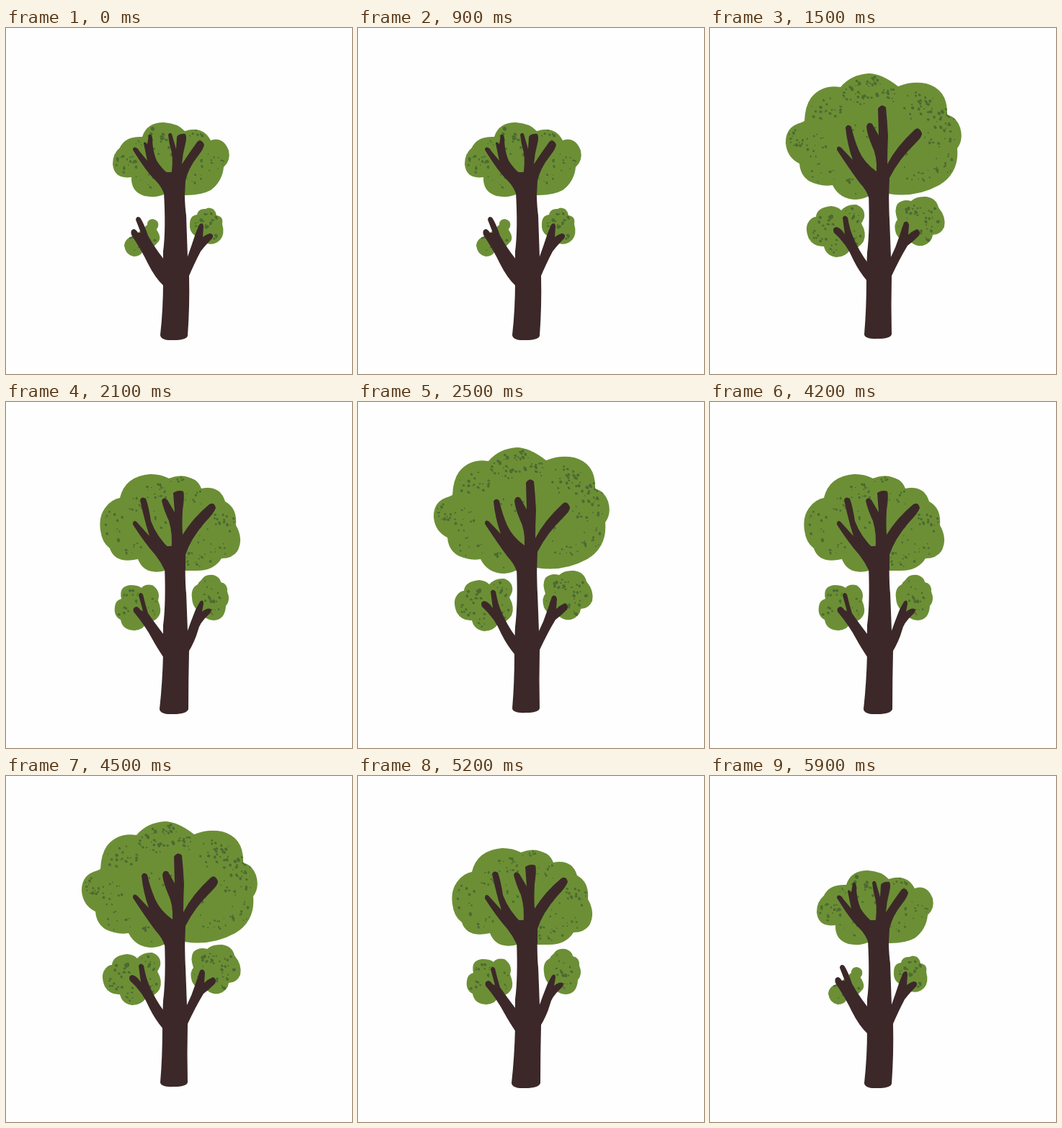
Animation of 480 by 480 pixels, one loop 6 s. Source, as an HTML page:

```html
<!DOCTYPE html>
<html lang="en">
<head>
<meta charset="utf-8">
<title>Growing tree</title>
<style>
  html, body { margin: 0; width: 100%; height: 100%; overflow: hidden; background: #fefefe; }
  svg { display: block; width: 100vw; height: 100vh; }
  .leaf { fill: #6c8f36; }
  .spot { fill: #4b6b31; }
  .wood { fill: #3c2829; }
</style>
</head>
<body>
<svg id="stage" viewBox="0 0 480 480"></svg>
<script>
const LOOP = 6000;
const NS = 'http://www.w3.org/2000/svg';
const stage = document.getElementById('stage');

// Each leaf blob: outline, then spot clusters [x, y, rx, ry, count, size].
const small = {
  leaves: [
    ['M148 189Q148 174 158 166Q165 150 189 151Q195 131 219 131Q238 132 248 143Q273 135 284 156Q301 150 309 170Q312 184 302 193Q300 213 284 225Q271 232 250 232L219 231Q208 236 192 233Q173 227 174 207Q150 210 148 189Z',
      [[168, 189, 17, 13, 21, 1.6], [211, 150, 15, 13, 12, 2], [218, 170, 16, 9, 9, 1.5], [263, 149, 13, 8, 7, 2],
       [285, 187, 20, 13, 15, 1.4], [199, 211, 24, 12, 9, 1.4], [266, 210, 15, 11, 7, 1.4], [185, 164, 10, 9, 6, 1.6]]],
    ['M196 273Q196 265 204 265Q213 267 211 276Q208 280 209 280Q217 292 210 298Q204 306 190 309Q187 317 177 317Q166 315 164 302Q165 291 178 288L188 280Z',
      [[181, 298, 14, 12, 9, 1.7], [203, 291, 6, 6, 3, 1.8]]],
    ['M255 272Q255 260 265 259Q267 250 277 251Q281 248 287 251Q291 254 292 260Q302 261 300 272Q304 286 297 294Q289 302 279 299Q269 298 266 290Q254 285 255 272Z',
      [[282, 265, 14, 13, 15, 1.8], [292, 289, 6, 6, 4, 1.6], [264, 276, 6, 8, 4, 1.4]]]
  ],
  wood: [
    'M214 426Q218 390 218 352Q218 330 218 310Q222 280 219 228L220 200L248 200Q247 240 250 260Q251 290 252 318Q254 332 254 345Q255 385 252 427Q250 433 232 433Q215 434 214 426Z',
    'M219 358Q207 347 197 327Q189 310 174 287Q172 280 177 279Q180 279 183 284L187 284L180 266Q181 260 186 263Q191 270 197 288Q203 300 219 321L226 340Z',
    'M251 320Q257 303 263 285L268 273Q273 268 274 275L273 290Q280 285 284 285Q289 287 286 292Q276 302 270 310Q262 325 253 346L246 335Z',
    'M220 232Q216 220 207 211Q195 200 176 169Q176 164 181 166L196 184L191 160Q192 156 196 161L198 149Q201 145 203 152Q203 170 209 184Q217 197 229 205Q232 188 230 173Q226 160 225 148Q227 144 230 147L236 168L237 151Q240 146 249 147Q251 152 249 160Q245 175 244 189Q255 172 266 157Q272 154 275 162Q274 168 266 178Q253 194 249 212L248 232Z'
  ]
};

const medium = {
  leaves: [
    ['M131 178Q128 158 139 145Q147 135 158 133Q165 103 200 100Q215 100 226 106Q244 98 262 108Q268 112 271 120Q297 115 304 138Q321 147 319 171Q330 190 321 207Q314 217 299 217Q288 235 262 234L221 234Q192 241 183 218Q151 225 144 203Q133 195 131 178Z',
      [[151, 170, 17, 25, 11, 1.6], [205, 125, 22, 12, 17, 1.7], [180, 142, 14, 9, 11, 1.4], [235, 107, 13, 4, 7, 1.7],
       [262, 129, 15, 15, 9, 1.5], [303, 167, 18, 22, 15, 1.6], [265, 218, 20, 12, 19, 1.5], [297, 201, 16, 12, 8, 1.4],
       [171, 202, 18, 10, 7, 1.6], [212, 165, 18, 18, 9, 1.4], [267, 184, 17, 17, 8, 1.3]]],
    ['M160 273Q156 256 172 254Q184 254 188 258Q192 252 203 254Q215 262 211 275Q217 290 212 297Q207 305 195 306Q191 316 178 317Q161 316 159 302Q149 297 151 284Q152 275 160 273Z',
      [[174, 270, 14, 11, 11, 1.7], [165, 291, 11, 8, 6, 1.6], [203, 284, 8, 14, 6, 1.5]]],
    ['M271 247Q276 238 288 240Q297 243 298 250Q308 252 307 263Q312 275 305 283Q304 302 288 303Q275 302 272 292Q259 288 258 272Q256 258 266 253Q268 249 271 247Z',
      [[284, 270, 13, 11, 14, 1.8], [292, 291, 8, 7, 5, 1.5], [281, 252, 9, 7, 3, 1.4]]]
  ],
  wood: [
    'M213 426Q217 390 218 350Q218 330 218 310Q222 280 220 228L221 200L249 200Q248 250 250 265Q251 290 252 318Q254 332 254 345Q253 385 253 426Q251 433 232 433Q214 434 213 426Z',
    'M219 355Q209 340 203 329Q193 310 177 291Q175 284 182 284Q185 286 187 289L190 290L184 268Q186 262 190 267Q193 280 197 293Q206 306 219 323L226 340Z',
    'M251 320Q257 303 263 288L269 277Q274 273 274 280L272 291Q279 285 284 287Q287 290 281 295Q268 307 266 318Q262 332 253 347L246 335Z',
    'M220 233Q215 222 207 212Q192 195 176 170Q176 163 181 166L199 186Q191 160 186 136Q188 130 194 134Q198 145 201 165Q209 187 229 206Q232 185 226 165Q219 150 216 137Q219 130 224 136L234 153L232 126Q239 121 246 124Q248 130 245 150Q244 170 245 184Q260 160 282 142Q289 138 291 147Q288 155 276 167Q256 190 249 212L249 233Z'
  ]
};

const large = {
  leaves: [
    ['M127 131Q104 137 105 160Q107 180 124 188Q126 212 150 217Q160 220 170 218Q180 238 203 238Q215 237 222 232L248 230Q285 236 318 218Q346 201 343 167Q352 155 347 138Q342 124 329 120Q330 85 300 77Q280 73 261 81Q238 63 220 63Q195 65 181 82Q155 78 140 97Q132 108 131 129Z',
      [[225, 73, 27, 8, 18, 1.7], [208, 92, 25, 15, 25, 1.8], [246, 96, 16, 14, 15, 1.7], [286, 105, 26, 22, 26, 1.8],
       [322, 127, 22, 15, 22, 1.9], [318, 152, 22, 15, 14, 1.6], [326, 188, 14, 18, 11, 1.7], [299, 204, 22, 14, 9, 1.4],
       [160, 112, 23, 17, 25, 1.7], [122, 150, 15, 14, 15, 1.8], [151, 164, 22, 18, 15, 1.6], [158, 200, 23, 14, 11, 1.4],
       [202, 216, 17, 14, 9, 1.6], [276, 187, 26, 26, 13, 1.4], [211, 145, 20, 22, 10, 1.4]]],
    ['M147 262Q148 249 168 247Q178 248 182 253Q190 244 203 245Q216 250 214 263Q212 268 210 271Q218 285 213 296Q207 306 195 307Q188 318 175 318Q161 316 158 303Q144 304 137 292Q130 275 139 266Q143 262 147 262Z',
      [[160, 266, 16, 14, 14, 1.8], [197, 260, 14, 11, 11, 1.6], [152, 288, 12, 9, 8, 1.6], [178, 303, 12, 10, 7, 1.7], [205, 289, 7, 11, 5, 1.5]]],
    ['M260 266Q255 252 260 244Q268 237 279 240Q286 233 300 234Q314 236 317 249Q328 262 325 276Q320 287 309 287Q308 298 295 302Q285 303 280 298Q265 299 258 285Q254 272 260 266Z',
      [[279, 254, 17, 12, 14, 1.8], [306, 264, 13, 16, 13, 1.7], [298, 287, 12, 10, 9, 1.7], [268, 281, 9, 10, 6, 1.5]]]
  ],
  wood: [
    'M214 425Q217 390 217 350Q217 330 218 312Q222 280 220 230L221 200L248 200Q248 250 249 265Q250 290 251 318Q252 332 252 345Q251 385 252 425Q250 431 233 431Q215 432 214 425Z',
    'M218 351Q207 338 199 322Q190 300 172 284Q169 277 175 276Q180 277 184 282L187 286L184 263Q187 258 191 263Q194 280 199 291Q207 310 219 326L226 340Z',
    'M250 320Q258 304 263 288L269 270Q274 266 276 273L275 287Q280 282 287 279Q293 282 290 288Q282 296 274 302Q263 320 251 346L246 335Z',
    'M220 235Q218 226 207 214Q193 195 176 169Q176 162 182 166L198 183Q190 160 188 138Q191 132 196 137Q200 155 207 171Q214 187 231 199Q232 178 225 164Q218 148 217 137Q219 129 225 133L234 149L233 112Q238 104 244 110Q246 130 247 150Q246 170 246 189Q258 165 284 141Q290 136 294 146Q295 150 285 160Q262 182 249 208L248 235Z'
  ]
};

// In-between pose: wood blended, leaves shrunk about their own anchors.
function blend(a, b, k) {
  const to = b.match(/\d+/g);
  let i = 0;
  return a.replace(/\d+/g, n => (+n + (to[i++] - n) * k).toFixed(1));
}
const anchors = [[232, 238, .922], [214, 306, .9], [258, 300, .87]];
const growing = {
  leaves: large.leaves,
  wood: medium.wood.map((d, i) => blend(d, large.wood[i].replace(/\s+/g, ' '), .5)),
  anchors
};

function add(parent, tag, attrs) {
  const el = document.createElementNS(NS, tag);
  for (const k in attrs) el.setAttribute(k, attrs[k]);
  return parent.appendChild(el);
}

function randomizer(seed) {
  return () => (seed = seed * 16807 % 2147483647) / 2147483647;
}

function spots(clusters, rnd) {
  let d = '';
  for (const [cx, cy, rx, ry, count, size] of clusters) {
    for (let i = 0; i < count; i++) {
      const a = rnd() * Math.PI * 2, r = Math.sqrt(rnd());
      const x = cx + Math.cos(a) * rx * r, y = cy + Math.sin(a) * ry * r;
      const w = size * (.45 + rnd() * .85), h = w * (.65 + rnd() * .35);
      const arc = `a${w.toFixed(2)} ${h.toFixed(2)} ${(rnd() * 90) | 0} 1 0 `;
      d += `M${(x - w).toFixed(1)} ${y.toFixed(1)}${arc}${2 * w} 0${arc}${-2 * w} 0`;
    }
  }
  return d;
}

function build(pose, index) {
  const g = add(stage, 'g', { visibility: 'hidden' });
  pose.leaves.forEach(([outline, clusters], i) => {
    const id = `clip${index}-${i}`;
    const leaf = add(g, 'g', {});
    if (pose.anchors) {
      const [x, y, s] = pose.anchors[i];
      leaf.setAttribute('transform', `translate(${x} ${y}) scale(${s}) translate(${-x} ${-y})`);
    }
    add(add(leaf, 'clipPath', { id }), 'path', { d: outline });
    add(leaf, 'path', { d: outline, class: 'leaf' });
    const rnd = randomizer(7919 * (index + 1) + 131 * i);
    add(leaf, 'path', { d: spots(clusters, rnd), class: 'spot', 'clip-path': `url(#${id})` });
  });
  for (const d of pose.wood) add(g, 'path', { d, class: 'wood' });
  return g;
}

const groups = [small, medium, growing, large].map(build);

// Start times of the four poses in each growth cycle.
const cycles = [
  [0, 100, 400, 500], [900, 1100, 1300, 1500], [2000, 2100, 2400, 2500],
  [3000, 3100, 3400, 3500], [3900, 4200, 4400, 4500], [4900, 5200, 5400, 5500], [5900]
];
const steps = cycles.flatMap(c => c.map((time, pose) => ({ time, pose })));

let shown = -1;
function show(t) {
  const { pose } = steps.findLast(s => s.time <= t);
  if (pose !== shown) {
    groups.forEach((g, i) => g.setAttribute('visibility', i === pose ? 'visible' : 'hidden'));
    shown = pose;
  }
}

function tick() {
  show(performance.now() % LOOP);
  requestAnimationFrame(tick);
}
show(0);
requestAnimationFrame(tick);
</script>
</body>
</html>
```
